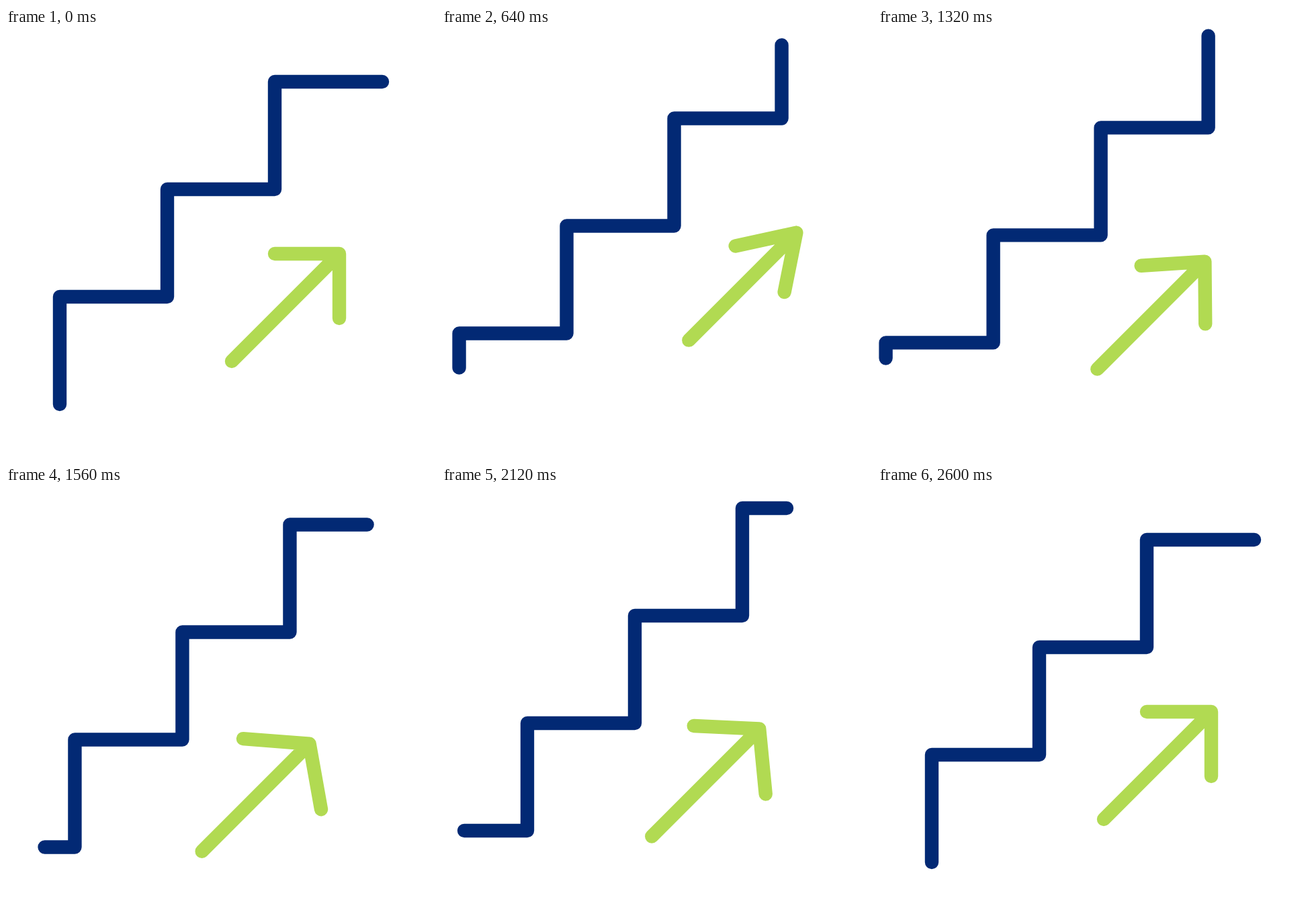
An HTML page that plays this animation: 640x640 px, repeating every 3000 ms.

```html
<!DOCTYPE html>
<html lang="en">
<head>
<meta charset="utf-8">
<title>Steps up</title>
<style>
  html, body { margin: 0; width: 100%; height: 100%; overflow: hidden; background: #fff; }
  svg { display: block; width: 100%; height: 100%; }
  path { fill: none; stroke-width: 20.4; stroke-linecap: round; stroke-linejoin: round; }
  #stairs { stroke: #022974; }
  #arrow { stroke: #b1da52; }
</style>
</head>
<body>
<svg viewBox="0 0 640 640">
  <path id="stairs"/>
  <path id="arrow"/>
</svg>
<script>
const LOOP = 3000, TICK = 40, STEP = 160;
const START = 120, END = 2600;
const stairs = document.getElementById('stairs');
const arrow = document.getElementById('arrow');

// Arrow poses: shift x, y, then bend of the left and lower barbs
const rest = [0, 0, 0, 0, 0, 0];
const high = [42.3, -42.3, 7.2, 26.7, -23.9, -10.3];
const low = [-47.5, 51, -3, -8.9, 18.9, 1.9];
const keys = [[START, rest], [900, high], [925, high], [1640, low], [END, rest]];

function ease(t, from, to) {
  const u = Math.min(1, Math.max(0, (t - from) / (to - from)));
  return u * u * (3 - 2 * u);
}

function pose(t) {
  let i = 0;
  while (i < keys.length - 2 && t >= keys[i + 1][0]) i++;
  const [from, a] = keys[i], [to, b] = keys[i + 1];
  const k = ease(t, from, to);
  return a.map((v, n) => v + (b[n] - v) * k);
}

const polyline = points => 'M' + points.map(p => p.map(v => v.toFixed(2)).join(' ')).join('L');

// Point at length s on an endless staircase that rises first
function stairPoint(s) {
  const k = Math.floor(s / STEP), r = s - k * STEP, flat = k % 2;
  return [
    80 + STEP * Math.floor(k / 2) + (flat ? r : 0),
    560 - STEP * Math.ceil(k / 2) - (flat ? 0 : r)
  ];
}

// A six-edge window climbs the staircase while the staircase slides back
function stairPath(t) {
  const d = 3 * STEP * ease(t, START, END) % STEP;
  const from = 2 * d, to = from + 6 * STEP;
  const marks = [from];
  for (let s = (Math.floor(from / STEP) + 1) * STEP; s < to; s += STEP) marks.push(s);
  marks.push(to);
  return polyline(marks.map(s => {
    const [x, y] = stairPoint(s);
    return [x - d, y + d];
  }));
}

function arrowPath(t) {
  const [dx, dy, lx, ly, rx, ry] = pose(t);
  const x = 496 + dx, y = 336 + dy;
  return polyline([[x - 160, y + 160], [x, y]]) +
    polyline([[x - 96 + lx, y + ly], [x, y], [x + rx, y + 96 + ry]]);
}

function draw(t) {
  stairs.setAttribute('d', stairPath(t));
  arrow.setAttribute('d', arrowPath(t));
}

const begin = performance.now();
function run() {
  const t = Math.max(0, performance.now() - begin) % LOOP;
  draw(Math.floor((t + 1) / TICK) * TICK % LOOP);
  requestAnimationFrame(run);
}
run();
</script>
</body>
</html>
```
